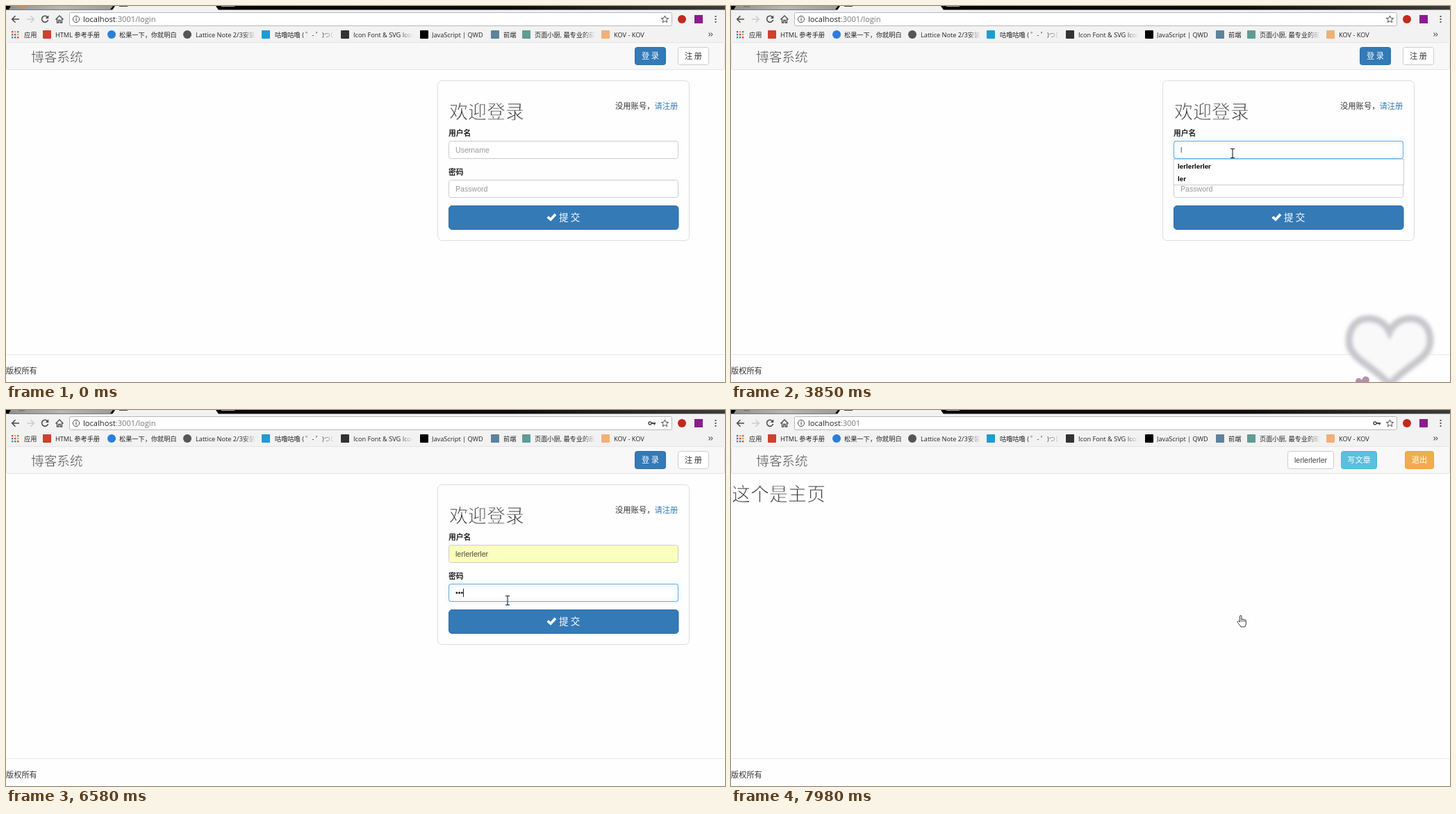
These frames come from a looping animation (1035 by 541 pixels, 8 s). An HTML page:

```html
<!DOCTYPE html>
<html lang="zh-CN">
<head>
<meta charset="utf-8">
<title>博客系统</title>
<style>
html, body { margin: 0; width: 100%; height: 100%; overflow: hidden; background: #fff; }
#stage { display: block; width: 1035px; height: 541px; }
text { font: 11.2px "Noto Sans CJK SC", "Noto Sans CJK", sans-serif; fill: #333; white-space: pre; }
.ui { font: 9.2px "Open Sans", "Noto Sans CJK SC", sans-serif; fill: #222; }
.url { font: 11.15px "Open Sans", sans-serif; fill: #222; }
.dim { fill: #777; }
/* a background-coloured outline thins the strokes */
.head { font-size: 27px; font-weight: 300; stroke: #fefefe; stroke-width: .9; }
.brand { font-size: 18.7px; font-weight: 300; fill: #444; stroke: #f8f8f8; stroke-width: .5; }
.label { font-size: 10.8px; font-weight: 700; fill: #222; }
.field { font: 10.6px "Liberation Sans", Arial, sans-serif; fill: #444; }
.hint { fill: #999; }
.item { font: bold 9.8px "Liberation Sans", Arial, sans-serif; fill: #000; }
.mid { text-anchor: middle; }
.white { fill: #fff; }
.submit { font-size: 13.6px; fill: #fff; }
.link { fill: #337ab7; }
.box { fill: #fff; stroke: #ccc; }
.glow { fill: none; stroke: #66afe9; filter: drop-shadow(0 0 3px rgba(102, 175, 233, .6)); }
.line { fill: none; stroke: #4a4a4a; stroke-width: 1.5; }
</style>
</head>
<body>
<svg id="stage" viewBox="0 0 1035 541">
  <defs>
    <linearGradient id="strip">
      <stop offset="0" stop-color="#000"/><stop offset=".7" stop-color="#0a0a0a"/><stop offset="1" stop-color="#3c3c3c"/>
    </linearGradient>
    <linearGradient id="tab">
      <stop offset="0" stop-color="#8d918f"/><stop offset=".5" stop-color="#b4b8b5"/><stop offset="1" stop-color="#999d9b"/>
    </linearGradient>
    <linearGradient id="fade">
      <stop offset="0" stop-color="#f2f2f2" stop-opacity="0"/><stop offset="1" stop-color="#f2f2f2"/>
    </linearGradient>
    <filter id="soft" x="-20%" y="-20%" width="140%" height="140%"><feGaussianBlur stdDeviation="2.8"/></filter>
  </defs>
  <rect width="1035" height="541" fill="#fefefe"/>

  <!-- browser -->
  <rect width="1035" height="6" fill="url(#strip)"/>
  <path d="M4 5 7 0H154L150 5Z" fill="url(#tab)"/>
  <path d="M153 6 157 0H302L306 6Z" fill="#f2f2f2"/>
  <path d="M309 0H328L330 1H311Z" fill="#aaa"/>
  <rect id="fav" x="18" width="9" height="1.5"/>
  <rect id="page" x="163" width="12" height="1" fill="#444"/>
  <rect y="5.5" width="1035" height="46.5" fill="#f2f2f2"/>
  <rect x="91.5" y="9.5" width="867" height="19" rx="2" fill="#fff" stroke="#b8b8b8"/>
  <path class="line" d="M19 19H9M13.5 14.2 8.7 19 13.5 23.8"/>
  <path class="line" d="M30 19H40M35.5 14.2 40.3 19 35.5 23.8" style="stroke:#ccc"/>
  <path class="line" d="M60 16.2A4.6 4.6 0 1 0 60.6 20"/>
  <path d="M61.3 13.5V18H56.8Z" fill="#4a4a4a"/>
  <path class="line" d="M71.5 19.5 77 14 82.5 19.5M73.5 18.5V24H75.8V20.5H78.2V24H80.5V18.5" style="stroke-width:1.3"/>
  <circle class="line" cx="101" cy="19" r="4.6" style="stroke-width:1"/>
  <path d="M100.5 16h1.1v1.2h-1.1zM100.5 18h1.1v3.6h-1.1z" fill="#444"/>
  <text class="url" x="111" y="23">localhost<tspan class="dim" id="path"></tspan></text>
  <g id="key">
    <circle class="line" cx="927" cy="19" r="2"/>
    <path class="line" d="M929 19H935M933.5 19V21.5" style="stroke-width:1.8"/>
  </g>
  <path class="line" d="M948.5 14 950 17.4 953.6 17.7 950.8 20.1 951.7 23.7 948.5 21.8 945.3 23.7 946.2 20.1 943.4 17.7 947 17.4Z" style="stroke-width:1"/>
  <circle cx="973" cy="19" r="6" fill="#c3281e"/>
  <rect x="991" y="13" width="12" height="12" fill="#8a1c90"/>
  <path d="M1020.5 14h2v2h-2zM1020.5 18h2v2h-2zM1020.5 22h2v2h-2z" fill="#555"/>
  <g id="marks"></g>
  <path class="line" d="M1011.5 38.5 1013.7 41 1011.5 43.5M1014.7 38.5 1016.9 41 1014.7 43.5" style="stroke-width:1.1"/>

  <!-- navigation bar and footer -->
  <rect x=".5" y="52.5" width="1034" height="39" rx="3" fill="#f8f8f8" stroke="#e4e4e4"/>
  <text class="brand" x="36" y="80.3">博客系统</text>
  <path d="M0 501.5H1035" stroke="#eaeaea"/>
  <text x="0" y="528.7">版权所有</text>

  <g id="heart">
    <path d="M948 469C941 454 927 449 914 450C897 452 888 467 890 486C893 509 927 519 948 545C969 519 1003 509 1006 486C1008 467 999 452 982 450C969 449 955 454 948 469Z" fill="#f9f9fa" stroke="#c6c6cc" stroke-width="10" filter="url(#soft)"/>
    <path d="M909 550C902 546 897 541 900 537Q904 533 908 538Q911 531 917 534C922 539 916 545 909 550Z" fill="#b78fae"/>
  </g>

  <g id="login">
    <rect x="905.5" y="59.5" width="44" height="25" rx="3" fill="#337ab7" stroke="#2e6da4"/>
    <text class="mid white" x="927.5" y="76.3">登 录</text>
    <rect class="box" x="967.5" y="59.5" width="44" height="25" rx="3"/>
    <text class="mid" x="989.5" y="76.3">注 册</text>
    <rect x="621.5" y="107.5" width="362" height="230" rx="6" fill="none" stroke="#ddd"/>
    <text class="head" x="638" y="162">欢迎登录</text>
    <text x="877" y="147.8" style="font-size:11.3px">没用账号，<tspan class="link">请注册</tspan></text>
    <text class="label" x="637" y="187">用户名</text>
    <text class="label" x="637" y="243">密码</text>

    <rect class="box" id="user" x="637.5" y="194.5" width="330" height="25" rx="3"/>
    <rect class="glow" id="userGlow" x="637.5" y="194.5" width="330" height="25" rx="3"/>
    <text class="field" id="name" x="647" y="211"></text>
    <rect class="box" x="637.5" y="250.5" width="330" height="25" rx="3"/>
    <rect class="glow" id="passGlow" x="637.5" y="250.5" width="330" height="25" rx="3"/>
    <text class="field hint" id="passHint" x="647" y="267">Password</text>
    <g id="dots" fill="#222"><circle cx="648.9" cy="263" r="1.5"/><circle cx="652.6" cy="263" r="1.5"/><circle cx="656.3" cy="263" r="1.5"/></g>
    <rect id="caret" width="1" height="12" fill="#222"/>

    <rect id="ring" x="636" y="286" width="332.5" height="37" rx="5" fill="none" stroke="#7fb0e6" stroke-width="1.6"/>
    <rect id="send" x="637.5" y="287.5" width="330.5" height="34" rx="4.5"/>
    <path d="M778.3 304.8 781 302 784 304.8 789.6 298.3 792.4 301 784.2 309.8Z" fill="#fff"/>
    <text class="submit" x="796" y="309.2">提 交</text>

    <g id="menu">
      <rect class="box" x="637" y="220.5" width="331.5" height="37"/>
      <rect id="row" x="637.5" y="221" width="330.5" height="18" fill="#e4e4e4"/>
      <text class="item" x="643" y="233.5">lerlerlerler</text>
      <text class="item" x="643" y="251.5">ler</text>
    </g>
  </g>

  <g id="home">
    <rect class="box" x="801.5" y="59.5" width="66" height="25" rx="3"/>
    <text class="field mid" x="834.5" y="76">lerlerlerler</text>
    <rect x="878.5" y="59.5" width="51" height="25" rx="3" fill="#5bc0de" stroke="#46b8da"/>
    <text class="mid white" x="904" y="76.3">写文章</text>
    <rect x="970.5" y="59.5" width="41" height="25" rx="3" fill="#f0ad4e" stroke="#eea236"/>
    <text class="mid white" x="991" y="76.3">退出</text>
    <text class="head" x="1" y="131">这个是主页</text>
  </g>

  <path id="arrow" d="M0 0V12.3L2.9 9.7 4.9 14 6.8 13.1 4.9 9H8.8Z" fill="#fff" stroke="#222" stroke-width=".9"/>
  <path id="beam" d="M-3-6.5H-.7L0-5.8.7-6.5H3M0-5.8V5.8M-3 6.5H-.7L0 5.8.7 6.5H3" fill="none" stroke="#222" stroke-width="1.1"/>
  <g id="hand" stroke="#222">
    <path d="M-1.5 9V1Q-1.5-.5-.3-.5T.9 1V5Q2.3 4.2 3.1 5.4 4.6 4.7 5.3 6 7.4 5.5 7.4 8V11Q7.3 13.5 5.8 16H0Q-1.5 13-4 10.8C-5.8 8.5-4.3 6.7-2.8 8Z" fill="#fff" stroke-width=".9"/>
    <path d="M.9 5V9M3.1 5.6V9M5.3 6.2V9" stroke-width=".7"/>
  </g>
</svg>
<script>
const LOOP = 8000, STEP = 70;
const HOME = 7700, PRESS = 7350;
const $ = id => document.getElementById(id);
const show = (id, on) => { $(id).style.display = on ? '' : 'none'; };
const within = (t, from, to) => t >= from && t < to;
const last = (list, t) => list.filter(item => item[0] <= t).pop();

// icon x, colour, text x, title, right edge, round icon
const marks = [
  [53, '#d0402b', 71, 'HTML 参考手册', 140],
  [146, '#2a7fdc', 163, '松果一下，你就明白', 250, 1],
  [255, '#555', 273, 'Lattice Note 2/3安装', 359, 1],
  [368, '#1f9bd1', 387, '咕噜咕噜 ( ゜- ゜)つロ', 472],
  [482, '#333', 500, 'Icon Font & SVG Icon', 586],
  [596, '#000', 613, 'JavaScript | QWD', 692],
  [698, '#5d829c', 716, '前端', 738],
  [743, '#5f9c94', 761, '页面小厨, 最专业的前端', 848],
  [857, '#f0b077', 875, 'KOV - KOV', 930]
];
const clipped = new Set([359, 472, 586, 848]);
const appColors = ['#d9443a', '#e8a33a', '#4a9c57', '#4577c9'];
let svg = '';
for (let i = 0; i < 9; i++)
  svg += `<rect x="${8 + i % 3 * 4}" y="${36 + Math.floor(i / 3) * 4}" width="2.4" height="2.4" fill="${appColors[i % 4]}"/>`;
svg += '<text class="ui" x="26" y="44.7">应用</text>';
for (const [x, color, tx, title, end, round] of marks) {
  svg += `<rect x="${x}" y="35" width="12" height="12" rx="${round ? 6 : 1}" fill="${color}"/>
    <svg x="${tx}" y="32" width="${end - tx}" height="18"><text class="ui" y="12.7">${title.replace('&', '&amp;')}</text></svg>`;
  if (clipped.has(end)) svg += `<rect x="${end - 18}" y="33" width="18" height="16" fill="url(#fade)"/>`;
}
$('marks').innerHTML = svg;

// pointer: time, x, y
const track = [
  [910, 915, 530], [980, 890, 492], [1050, 866, 455], [1190, 866, 455],
  [1260, 840, 430], [1400, 774, 352], [1540, 748, 300], [1750, 736, 249], [1890, 736, 249],
  [1960, 734, 243], [2100, 728, 226], [2310, 722, 212], [6440, 722, 212],
  [6580, 722, 274], [6650, 724, 281], [6930, 734, 296], [LOOP, 734, 296]
];
// caret: time, x, y; no x means hidden
const carets = [
  [0], [2590, 647, 201], [3080], [3360, 649.5, 201], [3850], [4620, 694.5, 201],
  [4900, 647, 257], [5390], [5530, 650.7, 257], [5810, 654.4, 257],
  [6160, 658, 257], [6650], [7140, 658, 257], [PRESS]
];
const names = [[0, 'Username'], [3360, 'l'], [4270, 'lerlerlerler']];

function pointerAt(t) {
  const i = Math.max(1, track.findIndex(p => p[0] > t));
  const [a, b] = [track[i - 1], track[i]];
  const k = (t - a[0]) / (b[0] - a[0]);
  return [a[1] + (b[1] - a[1]) * k, a[2] + (b[2] - a[2]) * k];
}

// three-step fade in and out
const ramp = (t, from) => Math.min(1, Math.max(0, (t - from + STEP) / (3 * STEP)));
const pulse = (t, from, to) => ramp(t, from) - ramp(t, to);

function drawPointer(t) {
  const [x, y] = pointerAt(t);
  let kind = y < 277 ? 'beam' : y < 287 || y > 322 ? 'arrow' : 'hand';
  if (within(t, 7420, HOME)) kind = 'arrow';
  for (const id of ['arrow', 'beam', 'hand']) show(id, t >= 910 && id === kind);
  $(kind).setAttribute('transform', `translate(${x} ${y})`);
  return t >= 910 && y >= 287 && y <= 322;
}

function draw(now) {
  const t = Math.floor(now % LOOP / STEP) * STEP;
  const hover = drawPointer(t);
  const pressed = t >= PRESS;
  const atHome = t >= HOME;

  show('login', !atHome);
  show('home', atHome);
  $('path').textContent = atHome ? ':3001' : ':3001/login';
  $('fav').setAttribute('fill', t < 2590 ? '#e88a35' : '#777');
  show('page', !within(t, HOME, 7980));
  show('key', t >= 5530);
  $('heart').style.opacity = pulse(t, 2590, 4900);
  $('userGlow').style.opacity = pulse(t, 2590, 4900);
  $('passGlow').style.opacity = pulse(t, 4900, PRESS);

  $('user').style.fill = t >= 4270 ? '#faffbd' : '#fff';
  $('name').textContent = last(names, t)[1];
  $('name').setAttribute('class', t < 3360 ? 'field hint' : 'field');
  show('menu', within(t, 3360, 4620));
  show('row', t >= 4270);
  show('passHint', t < 5530);
  [5530, 5810, 6160].forEach((at, i) => { $('dots').children[i].style.display = t >= at ? '' : 'none'; });

  const [, cx, cy] = last(carets, t);
  show('caret', cx);
  if (cx) {
    $('caret').setAttribute('x', cx);
    $('caret').setAttribute('y', cy);
  }
  show('ring', pressed);
  $('send').style.fill = pressed ? '#204d74' : hover ? '#286090' : '#337ab7';
  $('send').style.stroke = pressed ? '#122b40' : hover ? '#204d74' : '#2e6da4';
}

function tick() {
  draw(performance.now());
  requestAnimationFrame(tick);
}
tick();
</script>
</body>
</html>
```
